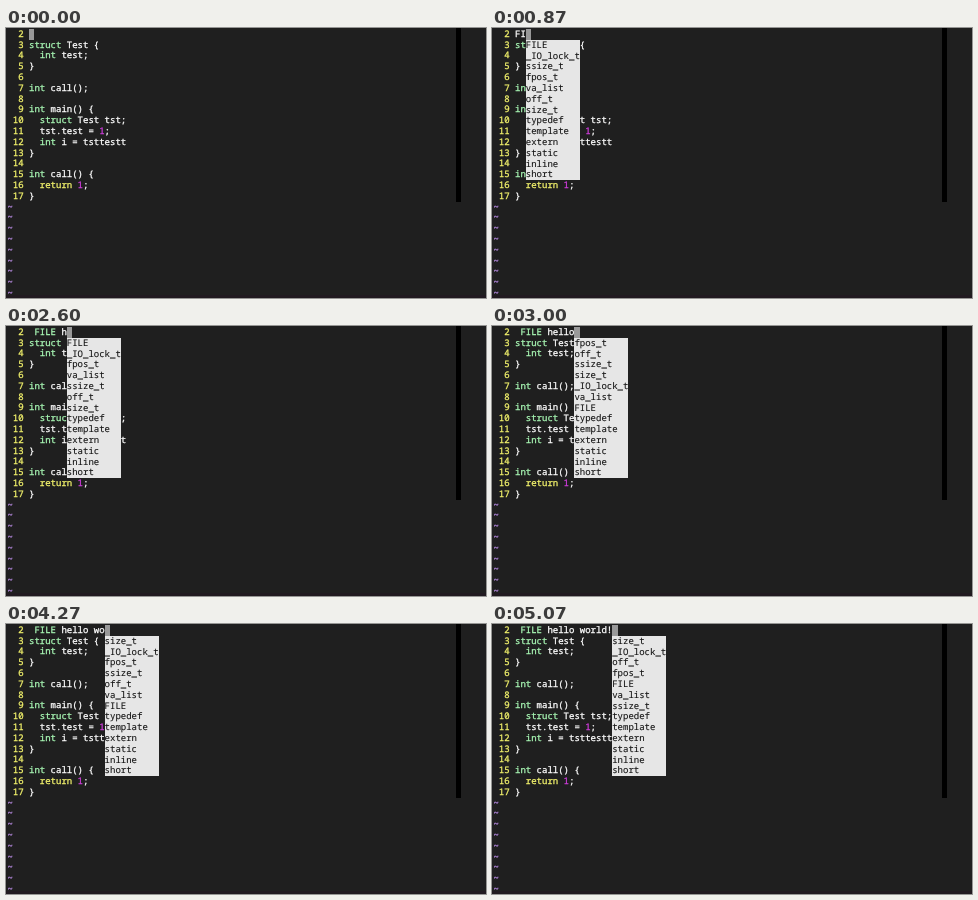
An HTML page for the animation above (5590 ms loop, 480 px wide and 270 px high).

```html
<!DOCTYPE html>
<html lang="en">
<head>
<meta charset="utf-8">
<style>
  html, body { margin: 0; width: 100%; height: 100%; overflow: hidden; background: #1f1f1f; }
  #stage { position: relative; width: 480px; height: 270px; overflow: hidden; }
  #stage > * { position: absolute; margin: 0; }
  pre {
    top: 0.8px; color: #fff;
    font: 500 9px/10.8px "Noto Sans Mono", monospace;
    text-rendering: geometricPrecision; font-variant-ligatures: none;
    -webkit-text-stroke: 0.3px currentColor;
  }
  #code { left: 1.4px; }
  #typed { left: 23px; }
  #menu {
    top: 11.9px; width: 54px; height: 140.4px; background: #e6e6e6; color: #111;
    -webkit-text-stroke-width: 0.1px;
  }
  #cursor { top: 1px; width: 5.4px; height: 10.9px; background: #999; }
  #bar { left: 450px; top: 0; width: 5px; height: 174px; background: #000; }
  #edge { left: 0; top: 267px; width: 480px; height: 3px; background: #211a20; }
  .num, .key { color: #f4f46c; }
  .type { color: #a8f8b4; }
  .const { color: #d03cdc; }
  .tilde { color: #b78be2; }
</style>
</head>
<body>
<div id="stage">
  <div id="bar"></div>
  <div id="edge"></div>
  <div id="cursor"></div>
  <pre id="code"></pre>
  <pre id="typed"></pre>
  <pre id="menu"></pre>
</div>
<script>
const LOOP = 5590, CELL = 5.4, LEFT = 23;
const [code, typed, menu, cursor] = ["code", "typed", "menu", "cursor"].map(id => document.getElementById(id));

const source = `
struct Test {
  int test;
}

int call();

int main() {
  struct Test tst;
  tst.test = 1;
  int i = tsttestt
}

int call() {
  return 1;
}`;

const types = {
  F: "FILE", I: "_IO_lock_t", s: "ssize_t", p: "fpos_t",
  v: "va_list", o: "off_t", z: "size_t"
};
const keywords = ["typedef", "template", "extern", "static", "inline", "short"];

// Start time, typed text, order of the type suggestions, menu column if not at the cursor
const steps = [
  [0, "", ""],
  [600, "F", "FIspvoz"],
  [870, "FI", "FIspvoz"],
  [1470, " FILE", "FIspvoz", 2],
  [2330, " FILE ", "FIpvsoz"],
  [2530, " FILE h", "FIpvsoz"],
  [2670, " FILE he", "FIpvsoz"],
  [2730, " FILE hel", "poszIvF"],
  [2800, " FILE hell", "poszIvF"],
  [2930, " FILE hello", "poszIvF"],
  [3470, " FILE hello.", "osvIFzp"],
  [4200, " FILE hello w", "osvIFzp"],
  [4270, " FILE hello wo", "zIpsovF"],
  [4330, " FILE hello wor", "zIpsovF"],
  [4470, " FILE hello world", "zIpsovF"],
  [4930, " FILE hello world!", "zIopFvs"]
];

const span = (name, text) => `<span class="${name}">${text}</span>`;

function highlight(line) {
  return line.replace(/\b(?:(struct|int|FILE)|(return)|(\d+))\b/g, (word, type, key) =>
    span(type ? "type" : key ? "key" : "const", word));
}

code.innerHTML = source.split("\n")
  .map((line, i) => span("num", String(i + 2).padStart(3)) + " " + highlight(line))
  .concat(Array(9).fill(span("tilde", "~")))
  .join("\n");

let shown;
function draw(now) {
  const time = now % LOOP;
  const step = steps.findLast(s => s[0] <= time);
  if (step !== shown) {
    shown = step;
    const [, text, order, column = text.length] = step;
    typed.innerHTML = highlight(text);
    cursor.style.left = LEFT + text.length * CELL + "px";
    menu.hidden = !order;
    menu.style.left = LEFT + column * CELL + "px";
    menu.textContent = [...order].map(k => types[k]).concat(keywords).join("\n");
  }
}

const start = performance.now();
function tick() {
  draw(performance.now() - start);
  requestAnimationFrame(tick);
}
tick();
</script>
</body>
</html>
```
